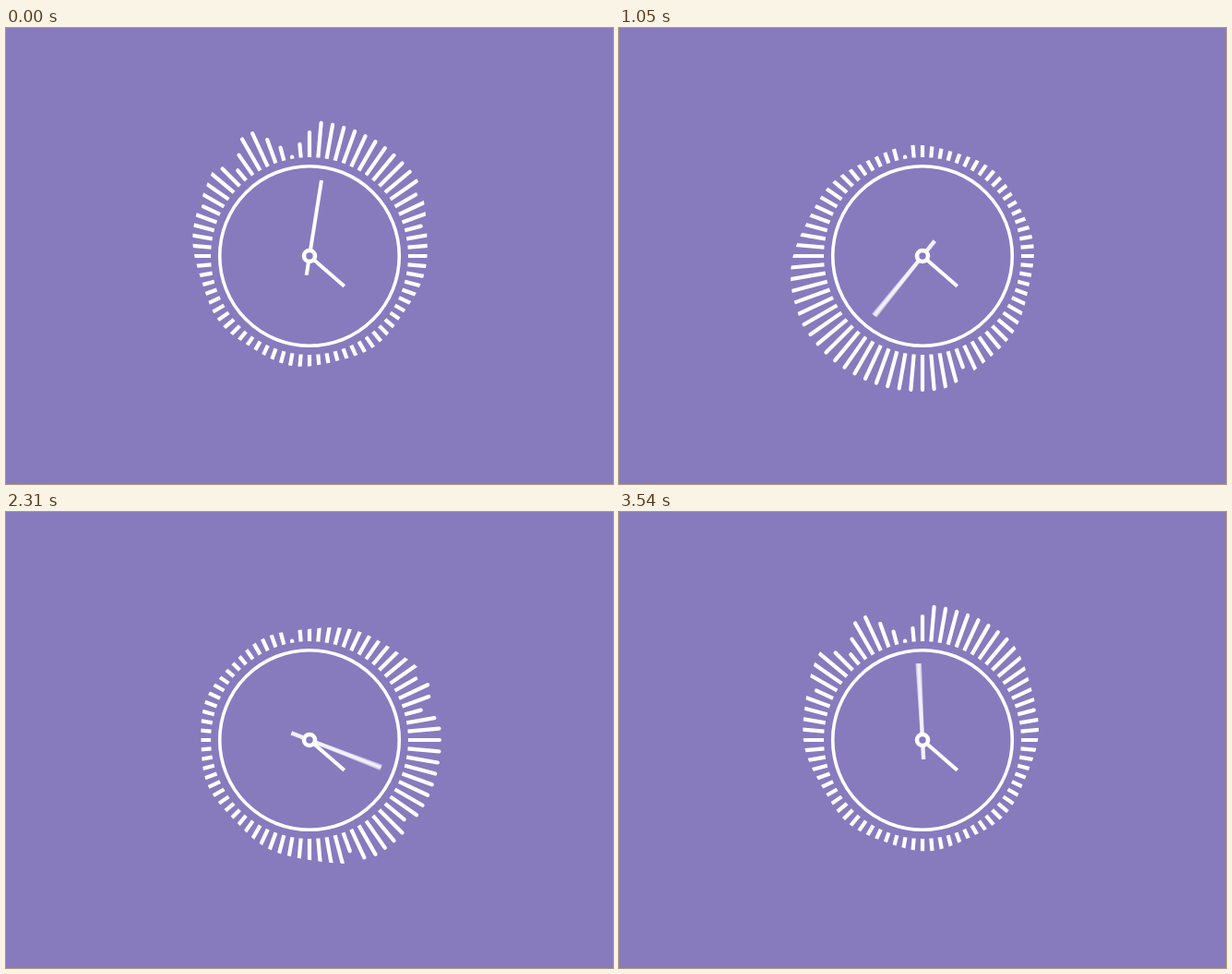
These frames come from a looping animation (658x494 px, 3.57 s). An HTML page with a canvas:

```html
<!DOCTYPE html>
<html lang="en">
<head>
<meta charset="utf-8">
<title>Clock</title>
<style>
  html, body { margin: 0; overflow: hidden; background: #877bbe; }
  canvas { display: block; }
</style>
</head>
<body>
<canvas id="stage" width="658" height="494"></canvas>
<script>
const ctx = document.getElementById('stage').getContext('2d');
const LOOP = 3570, STEP = 30, DEG = Math.PI / 180;
const INNER = 107, BAR_GAP = 5;

// Valleys in the skyline of bars: angle from the top, lowest radius
const valleys = [[60, 135], [75, 127], [130, 136], [160, 130], [295, 129], [320, 123], [350, 111]];

// Full outer radius of the bar at an angle; valleys have straight sides
function barRadius(angle) {
  const sides = valleys.map(([at, low]) => {
    const apart = Math.abs(angle - at);
    return low + 2.5 * Math.min(apart, 360 - apart);
  });
  return Math.min(147 - 4 * Math.sin(angle * DEG), ...sides);
}

// Edge of the blob that reveals the bars; it bulges towards the minute hand
function edge(offset) {
  const bulge = Math.abs(Math.cos((offset + 4) / 2 * DEG)) ** 5;
  return 119 + 37 * bulge + 1.5 * Math.cos(8 * offset * DEG);
}

function rotated(angle, draw) {
  ctx.save();
  ctx.rotate(angle * DEG);
  draw();
  ctx.restore();
}

function line(from, to, width) {
  ctx.lineWidth = width;
  ctx.beginPath();
  ctx.moveTo(0, -from);
  ctx.lineTo(0, -to);
  ctx.stroke();
}

function ring(radius, width) {
  ctx.lineWidth = width;
  ctx.beginPath();
  ctx.arc(0, 0, radius, 0, 2 * Math.PI);
  ctx.stroke();
}

function drawBars(hand) {
  ctx.save();
  ctx.beginPath();
  for (let a = 0; a < 360; a += 2) {
    const r = edge(a - hand);
    ctx.lineTo(r * Math.sin(a * DEG), -r * Math.cos(a * DEG));
  }
  ctx.closePath();
  ctx.moveTo(INNER, 0);
  ctx.arc(0, 0, INNER, 0, 2 * Math.PI);
  ctx.clip('evenodd');
  ctx.lineCap = 'round';
  for (let a = 0; a < 360; a += BAR_GAP) {
    rotated(a, () => line(INNER, barRadius(a) - 2, 4.2));
  }
  ctx.restore();
}

// The hand starts sharp and is slightly smeared once it moves
function drawMinuteHand(hand, moving) {
  const smear = moving ? [-0.9, 0, 0.9] : [0];
  ctx.globalAlpha = moving ? 0.55 : 1;
  for (const d of smear) rotated(hand + d, () => line(-21, 83, 4));
  ctx.globalAlpha = 1;
}

function frame(now) {
  const t = Math.floor((now % LOOP) / STEP) * STEP;
  const hand = 9 + t * 0.2;

  ctx.setTransform(1, 0, 0, 1, 0, 0);
  ctx.fillStyle = '#877bbe';
  ctx.fillRect(0, 0, 658, 494);
  ctx.translate(329, 247);
  ctx.strokeStyle = '#fff';

  drawBars(hand);
  ring(97.3, 3.6);
  rotated(131, () => line(0, 50, 4));
  drawMinuteHand(hand, t > 0);

  ctx.beginPath();
  ctx.arc(0, 0, 6, 0, 2 * Math.PI);
  ctx.fill();
  ring(6, 4.6);
  requestAnimationFrame(frame);
}

requestAnimationFrame(frame);
</script>
</body>
</html>
```
